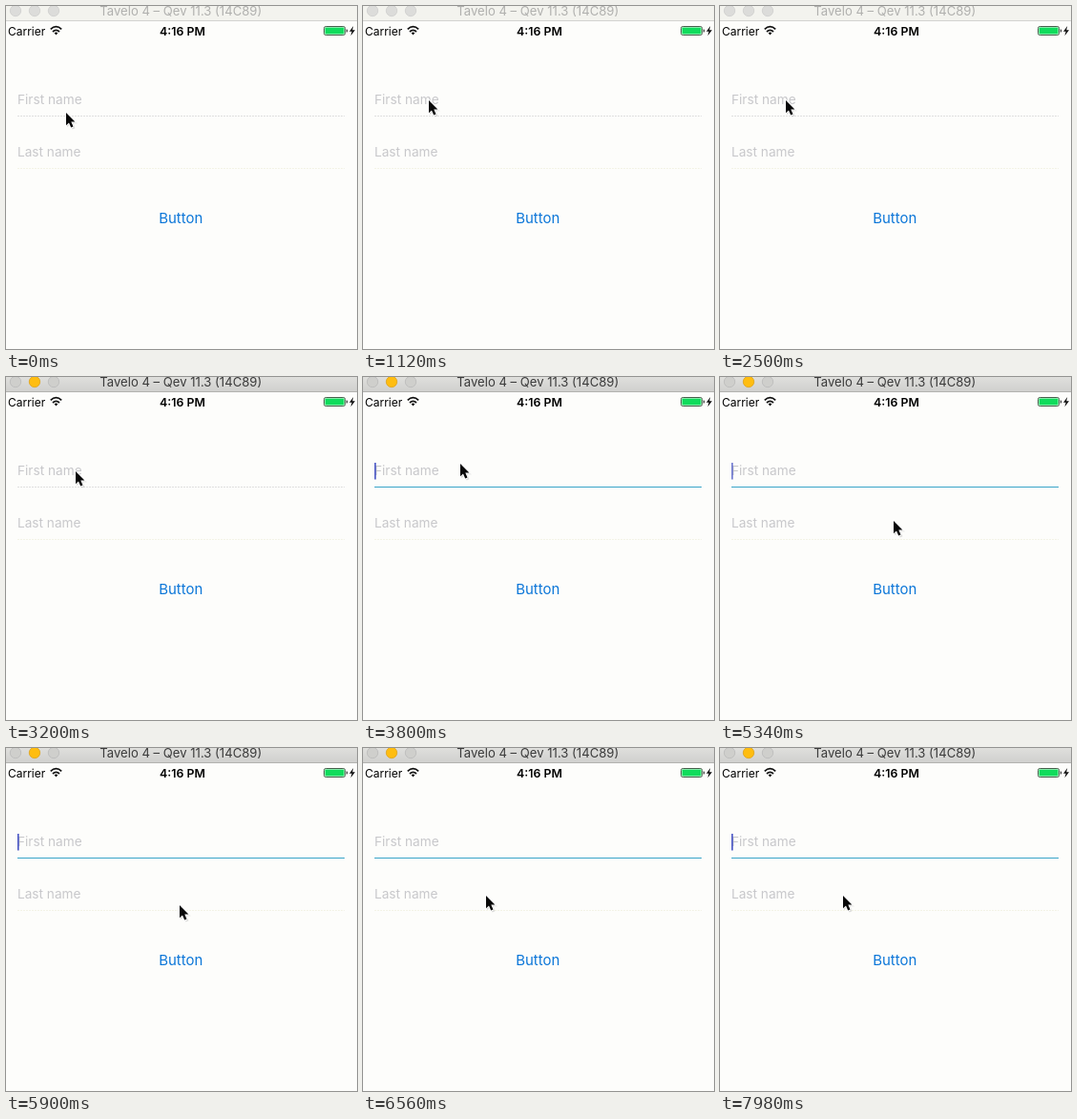
Write an HTML page that moves like this. It is 368x360 px and loops after 8 s.

```html
<!DOCTYPE html>
<html lang="en">
<head>
<meta charset="utf-8">
<title>Text field focus</title>
<style>
  html, body { margin: 0; width: 100%; height: 100%; overflow: hidden; background: #fdfdfb; }
  svg { display: block; width: 368px; height: 360px; }
  text { font-family: Inter, "Liberation Sans", sans-serif; }
  .bar { fill: #f3f3ee; }
  .edge { fill: #d3d3d0; }
  .title { fill: #b0b0ae; font-size: 13.1px; text-anchor: middle; }
  .light { fill: #dcdcda; stroke: #cfcfcd; stroke-width: .8; }
  .active .bar { fill: url(#chrome); }
  .active .edge { fill: #b2b2af; }
  .active .title { fill: #3a3a3a; }
  .active .light { fill: #cfcfcc; stroke: #bababa; }
  .active .minimise { fill: #ffbd10; stroke: #dfa31b; }
  .hint { fill: #c8c8cb; font-size: 13.65px; }
  .rule { stroke: #dfdfdf; stroke-dasharray: 2 1; }
  .pale { stroke: #f3f3e6; }
  .focused .rule.first { stroke: #39a5c9; stroke-dasharray: none; }
</style>
</head>
<body>
<svg id="stage" viewBox="0 0 368 360">
  <defs>
    <linearGradient id="chrome" x2="0" y2="1">
      <stop stop-color="#dfdfdc"/>
      <stop offset="1" stop-color="#d0d0ce"/>
    </linearGradient>
  </defs>
  <rect width="368" height="360" fill="#fdfdfb"/>

  <rect class="bar" width="368" height="15"/>
  <rect class="edge" y="15" width="368" height="1"/>
  <circle class="light" cx="10" cy="5" r="5.7"/>
  <circle class="light minimise" cx="30" cy="5" r="5.7"/>
  <circle class="light" cx="50" cy="5" r="5.7"/>
  <text class="title" x="183.3" y="10">Tavelo 4 – Qev 11.3 (14C89)</text>

  <text x="2" y="31" font-size="12">Carrier</text>
  <g fill="none" stroke="#111" stroke-width="1.8">
    <path d="M46.8 24.3Q52.5 19 58.2 24.3M49 27Q52.5 23.8 56 27"/>
    <path d="M50.6 28.2Q52.5 26.6 54.4 28.2L52.5 30.6Z" fill="#111" stroke="none"/>
  </g>
  <text x="185" y="31" font-size="12.4" font-weight="600" text-anchor="middle">4:16 PM</text>
  <rect x="333.5" y="21.5" width="22" height="9" rx="1.8" fill="#fdfdfb" stroke="#45604a"/>
  <rect x="334.5" y="22.5" width="20" height="7" rx=".8" fill="#10dc5c"/>
  <path d="M356.8 24.2Q358.2 24.5 358.2 26T356.8 27.8Z" fill="#333"/>
  <path d="M364.2 21L360 26.8H362.6L361.4 31.2L366 25.2H363.2Z" fill="#111"/>

  <text class="hint" x="12" y="103.3">First name</text>
  <path class="rule first" d="M12 115.5H355"/>
  <text class="hint" x="12" y="158.3">Last name</text>
  <path class="rule pale" d="M12 170.5H355"/>
  <rect id="caret" x="12" y="90" width="1.6" height="17.5" fill="#4653c4"/>
  <text x="183.3" y="228" font-size="15" text-anchor="middle" fill="#0b76d8">Button</text>

  <g id="pointer">
    <path d="M2 3V16L5.3 13.2L7.7 18.4L10.5 17.2L8.3 12.2H12.8Z" fill="#9a9a9a" opacity=".35"/>
    <path d="M1 1V14.2L4 11.4L6.2 16.6L8.5 15.6L6.3 10.6H10.4Z" fill="#080808" stroke="#fff" stroke-width="1.6" paint-order="stroke"/>
  </g>
</svg>
<script>
  const LOOP = 8000, ACTIVATE = 2640, FOCUS = 3420;
  const stage = document.getElementById('stage');
  const caret = document.getElementById('caret');
  const pointer = document.getElementById('pointer');

  // time, x, y of the pointer tip
  const path = [
    [0, 62, 111], [420, 62, 111], [620, 60, 99], [840, 61, 110],
    [1000, 58, 109], [1120, 68, 98], [2500, 68, 98], [3100, 72, 98],
    [3400, 72, 98], [3800, 101, 90], [4200, 106, 90], [4920, 104, 90],
    [5040, 106, 93], [5340, 181, 150], [5700, 181, 164], [5900, 181, 164],
    [6500, 128, 154], [LOOP, 128, 154]
  ];

  const clamp = v => Math.max(0, Math.min(1, v));
  const smooth = v => v * v * (3 - 2 * v);

  function pointerAt(t) {
    const next = path.findIndex(p => p[0] > t);
    const [t0, x0, y0] = path[next - 1], [t1, x1, y1] = path[next];
    const k = smooth((t - t0) / (t1 - t0));
    return [x0 + (x1 - x0) * k, y0 + (y1 - y0) * k];
  }

  // Stays lit for most of each second, with a short fade out and in.
  function caretOpacity(t) {
    const phase = t % 1000;
    return clamp(1 - (phase - 300) / 200) + clamp((phase - 600) / 180);
  }

  function draw(now) {
    const t = now % LOOP, focused = t >= FOCUS;
    stage.classList.toggle('active', t >= ACTIVATE);
    stage.classList.toggle('focused', focused);
    caret.setAttribute('opacity', focused ? caretOpacity(t) : 0);
    pointer.setAttribute('transform', `translate(${pointerAt(t)})`);
  }

  const start = performance.now();
  function tick() {
    draw(performance.now() - start);
    requestAnimationFrame(tick);
  }
  tick();
</script>
</body>
</html>
```
